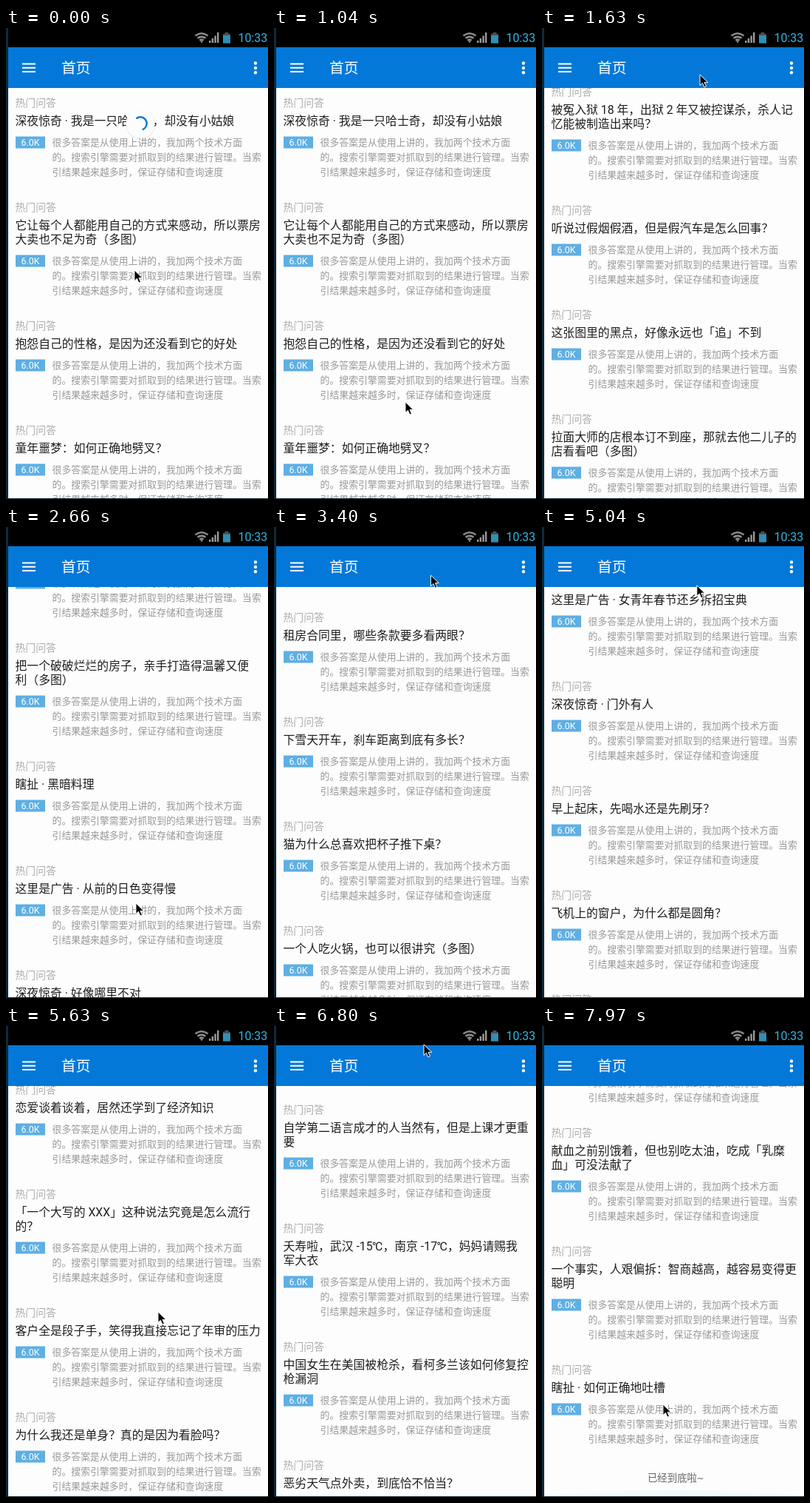
These frames come from a looping animation (355 px wide and 636 px high, 8 s). An HTML page:

```html
<!DOCTYPE html>
<html lang="zh-CN">
<head>
<meta charset="utf-8">
<title>首页</title>
<style>
html, body { margin: 0; width: 100%; height: 100%; overflow: hidden; background: #fdfdfd; }
svg { display: block; width: 100%; height: 100%; }
text { font-family: Roboto, "Noto Sans CJK SC", "Noto Sans CJK", sans-serif; white-space: pre; }
.cat { font-size: 13.86px; fill: #acacac; }
.title { font-size: 15.84px; fill: #1e1e1e; }
.body { font-size: 12.88px; fill: #999; }
.badge { font-size: 12.4px; fill: #fff; text-anchor: middle; }
</style>
</head>
<body>
<svg viewBox="0 0 355 636">
  <defs>
    <radialGradient id="glow">
      <stop offset="0" stop-color="#33b5e5" stop-opacity=".75"/>
      <stop offset=".6" stop-color="#33b5e5" stop-opacity=".45"/>
      <stop offset="1" stop-color="#33b5e5" stop-opacity=".08"/>
    </radialGradient>
  </defs>
  <rect width="355" height="636" fill="#fdfdfd"/>
  <g id="list"></g>
  <g id="dots" fill="#5aaade">
    <circle cx="171" cy="610"/><circle cx="181" cy="610"/><circle cx="191.5" cy="610"/>
  </g>
  <ellipse id="edge" cx="179" cy="637" rx="166" ry="25" fill="url(#glow)"/>
  <g id="spinner">
    <circle r="20.5" cy="1" fill="#000" opacity=".05"/>
    <circle r="19.5" fill="#fcfcfc"/>
    <circle id="arc" r="8.7" fill="none" stroke="#0a7ad8" stroke-width="2.5" stroke-dasharray="30.4 60"/>
  </g>

  <rect width="355" height="26" fill="#000"/>
  <rect y="26" width="355" height="55" fill="#0478d8"/>
  <path d="M22 48.5h18M22 53.8h18M22 59h18" stroke="#fff" stroke-width="2"/>
  <text x="75" y="61" font-size="19.8" fill="#fff">首页</text>
  <g fill="#fff"><circle cx="338" cy="47.5" r="2.2"/><circle cx="338" cy="54" r="2.2"/><circle cx="338" cy="60.3" r="2.2"/></g>
  <g fill="none" stroke="#8a8a8a" stroke-width="2.6">
    <path d="M256.5 10.5q8.500-6.500 17 0M259.500 13.800q5.500-4 11 0M262.300 16.800q2.700-2 5.400 0"/>
  </g>
  <path d="M263 17.500h4l-2 3z" fill="#8a8a8a"/>
  <path d="M275 20v-3h2.400v3zM278.700 20v-6h2.400v6zM282.400 20v-9.500h2.400v9.500zM286 20v-14h2.400v14z" fill="#9a9a9a"/>
  <path d="M294 8h2.500v-2h5v2h2.500v12.500h-10z" fill="#4a4f52"/>
  <rect x="294" y="10" width="10" height="10.500" fill="#2f8fb5"/>
  <text x="314.500" y="19" font-size="16" fill="#33b5e5">10:33</text>

  <rect width="3" height="636" fill="#0d2a3c"/>
  <rect y="635" width="355" height="1" fill="#14212b"/>
  <path id="cursor" d="M0 0v14.500l3.400-3.200 2.500 5.700 2.600-1.100-2.500-5.500h4.800z" fill="#000" stroke="#fff" stroke-width="1"/>
</svg>
<script>
const LOOP = 8000;
const titles = [
  "深夜惊奇 · 我是一只哈士奇，却没有小姑娘",
  "它让每个人都能用自己的方式来感动，所以票房|大卖也不足为奇（多图）",
  "抱怨自己的性格，是因为还没看到它的好处",
  "童年噩梦：如何正确地劈叉？",
  "被冤入狱 18 年，出狱 2 年又被控谋杀，杀人记|忆能被制造出来吗？",
  "听说过假烟假酒，但是假汽车是怎么回事？",
  "这张图里的黑点，好像永远也「追」不到",
  "拉面大师的店根本订不到座，那就去他二儿子的|店看看吧（多图）",
  "冬天的阳台，也能种出一盆好菜",
  "为什么有的人一坐车就想睡觉？",
  "每天走一万步，膝盖会不会受伤？",
  "把一个破破烂烂的房子，亲手打造得温馨又便|利（多图）",
  "瞎扯 · 黑暗料理",
  "这里是广告 · 从前的日色变得慢",
  "深夜惊奇 · 好像哪里不对",
  "租房合同里，哪些条款要多看两眼？",
  "下雪天开车，刹车距离到底有多长？",
  "猫为什么总喜欢把杯子推下桌？",
  "一个人吃火锅，也可以很讲究（多图）",
  "记不住别人的脸，是一种病吗？",
  "老房子的墙为什么冬暖夏凉？",
  "18 世纪的书居然长得跟智能手机屏幕一样",
  "瞎扯 · 如何正确地吐槽",
  "这里是广告 · 女青年春节还乡拆招宝典",
  "深夜惊奇 · 门外有人",
  "早上起床，先喝水还是先刷牙？",
  "飞机上的窗户，为什么都是圆角？",
  "第一次下厨，先从一碗面开始",
  "学会拒绝，其实没有那么难",
  "恋爱谈着谈着，居然还学到了经济知识",
  "「一个大写的 XXX」这种说法究竟是怎么流行|的？",
  "客户全是段子手，笑得我直接忘记了年审的压力",
  "为什么我还是单身？真的是因为看脸吗？",
  "自学第二语言成才的人当然有，但是上课才更重|要",
  "夭寿啦，武汉 -15℃，南京 -17℃，妈妈请赐我|军大衣",
  "中国女生在美国被枪杀，看柯多兰该如何修复控|枪漏洞",
  "恶劣天气点外卖，到底恰不恰当？",
  "献血之前别饿着，但也别吃太油，吃成「乳糜|血」可没法献了",
  "一个事实，人艰偏拆：智商越高，越容易变得更|聪明",
  "瞎扯 · 如何正确地吐槽"
];
const summary = ["很多答案是从使用上讲的，我加两个技术方面",
  "的。搜索引擎需要对抓取到的结果进行管理。当索",
  "引结果越来越多时，保证存储和查询速度"];
const PAGE = 24, LOADED = 4650;

const $ = id => document.getElementById(id);
const set = (el, attrs) => { for (const k in attrs) el.setAttribute(k, attrs[k]); return el; };
function add(parent, tag, attrs, text) {
  const el = set(document.createElementNS("http://www.w3.org/2000/svg", tag), attrs);
  if (text) el.textContent = text;
  return parent.appendChild(el);
}

// Each item is placed by the middle of its category line.
const tops = [0], rows = [];
titles.forEach((title, i) => {
  const lines = title.split("|"), y = tops[i];
  const mid = y + 53.5 + (lines.length - 1) * 19;
  const g = add($("list"), "g", {});
  add(g, "text", { class: "cat", x: 12.5, y: y + 5 }, "热门问答");
  lines.forEach((s, n) => add(g, "text", { class: "title", x: 12.5, y: y + 30.3 + n * 19 }, s));
  add(g, "rect", { x: 13, y: mid - 8, width: 40, height: 16, fill: "#5eafe3" });
  add(g, "text", { class: "badge", x: 33, y: mid + 4.5 }, "6.0K");
  summary.forEach((s, n) => add(g, "text", { class: "body", x: 62.5, y: mid + 4.5 + n * 20 }, s));
  rows.push(g);
  tops.push(y + 88 + mid - y - 0.5);
});
add($("list"), "text", { x: 181, y: tops[titles.length] + 10, "font-size": 13.4, fill: "#666", "text-anchor": "middle" }, "已经到底啦~");

// Scroll offset that shows item i at height y.
const at = (i, y) => tops[i] + 101 - y;
const s1 = at(4, 86), s2 = at(11, 163), s3 = at(PAGE, 605),
  s4 = at(29, 86), s5 = at(33, 113), s6 = at(titles.length, 605);

// Keys: [time, value, speed]
const scroll = [
  [0, 0, 0], [1050, 0, 0], [1520, 440, 1.4], [1630, s1, 1.4], [2450, s2, 0],
  [2750, s2, 0], [3300, s2 + 440, 1.8], [3850, s3, 1.4], [3851, s3, 0],
  [4700, s3, 0], [5060, s3 + 430, 2], [5630, s4, .3], [6000, s4 + 70, 0],
  [6250, s4 + 70, 0], [6800, s5, 1.9], [7060, s6, 2.2], [7061, s6, 0], [LOOP, s6, 0]
];
const mouseX = [
  [0, 174, 0], [1050, 178, 0], [1520, 214, 0], [1700, 214, 0], [2450, 176, 0], [2750, 176, 0],
  [3300, 212, 0], [4300, 229, 0], [4700, 190, 0], [5060, 210, 0], [5630, 206, 0],
  [6250, 182, 0], [6800, 203, 0], [7970, 164, 0], [LOOP, 164, 0]
];
const mouseY = [
  [0, 327, .3], [700, 505, 0], [1050, 505, 0], [1520, 63, 0], [1700, 63, 0], [2450, 508, 0],
  [2750, 508, 0], [3300, 66, 0], [3600, 63, 0], [4300, 345, .6], [4600, 505, 0], [4700, 505, 0],
  [5060, 75, 0], [5200, 75, 0], [5630, 386, .5], [6000, 510, 0], [6250, 510, 0],
  [6800, 25, 0], [7090, 59, .2], [7800, 511, 0], [LOOP, 511, 0]
];

function sample(keys, t) {
  let i = 1;
  while (i < keys.length - 1 && t > keys[i][0]) i++;
  const [t0, a, va] = keys[i - 1], [t1, b, vb] = keys[i];
  const d = t1 - t0, u = (t - t0) / d, w = 1 - u;
  return w * w * (1 + 2 * u) * a + u * u * (1 + 2 * w) * b + u * w * d * (w * va - u * vb);
}

const clamp = x => Math.max(0, Math.min(1, x));
const glowAt = age => age < 0 ? 0 : clamp(age / 120) * clamp((1000 - age) / 750);

function draw(t) {
  const offset = Math.round(sample(scroll, t));
  set($("list"), { transform: `translate(0 ${101 - offset})` });
  rows.forEach((row, i) => {
    const y = tops[i] + 101 - offset;
    const shown = y > -120 && y < 660 && (i < PAGE || t >= LOADED);
    row.style.display = shown ? "" : "none";
  });

  const foot = tops[PAGE] + 106 - offset;
  $("dots").style.display = t < LOADED ? "" : "none";
  [...$("dots").children].forEach((dot, i) =>
    set(dot, { cy: foot, r: 3.2 + 1.5 * Math.sin((t - 4300) / 160 + (i - 1) * 1.1) }));

  const glow = Math.max(glowAt(t - 3850), glowAt(t - 7060));
  set($("edge"), { opacity: glow, ry: 10 + 15 * Math.min(1, glow * 1.4) });

  const size = clamp((850 - t) / 150);
  set($("spinner"), { transform: `translate(182 129) scale(${size})` });
  set($("arc"), { transform: `rotate(${-130 + t * .5})` });

  set($("cursor"), { transform: `translate(${sample(mouseX, t)} ${sample(mouseY, t)})` });
}

let start;
function tick(now) {
  start ??= now;
  draw((now - start) % LOOP);
  requestAnimationFrame(tick);
}
draw(0);
requestAnimationFrame(tick);
</script>
</body>
</html>
```
